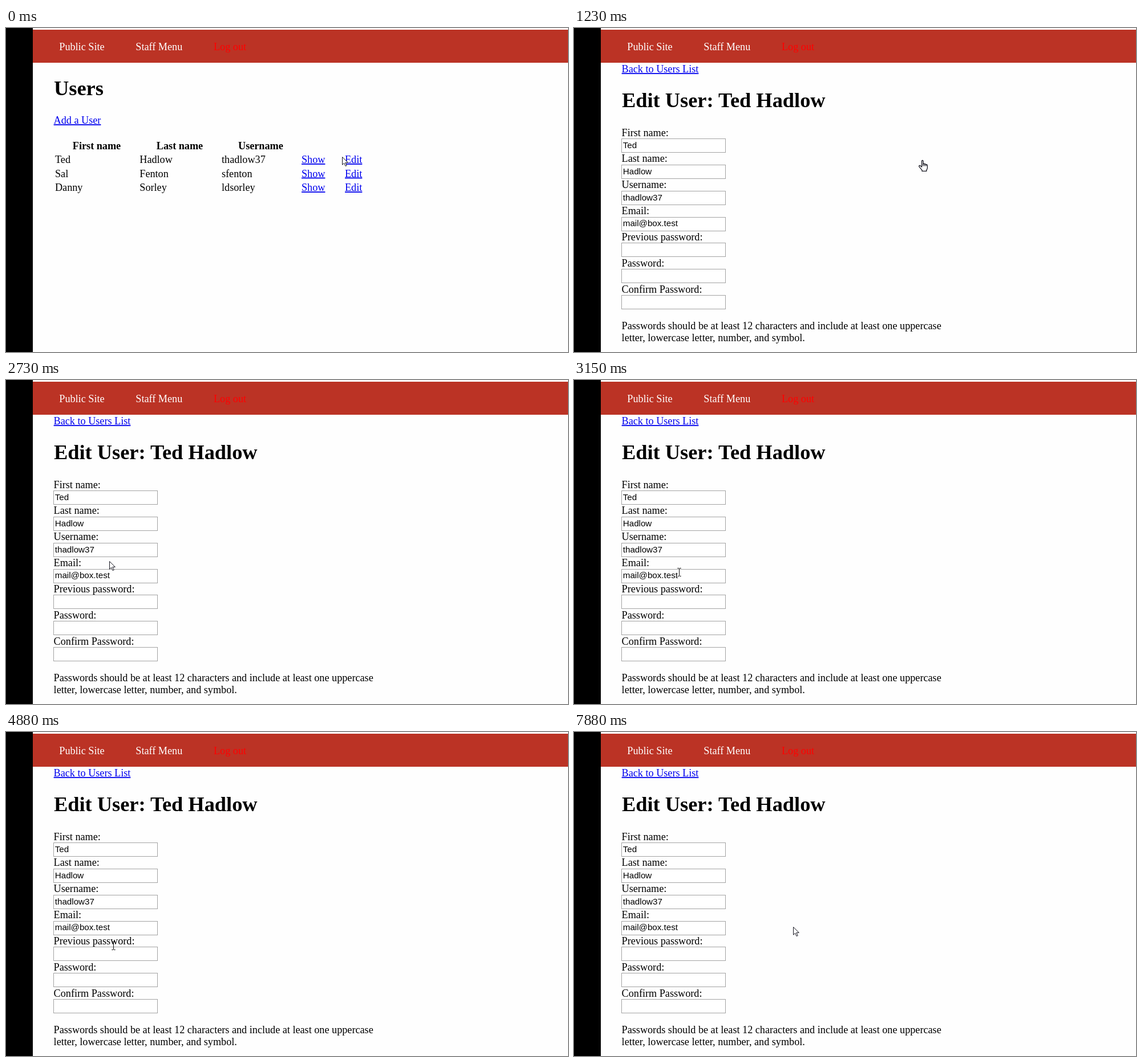
An HTML page that plays this animation: 985x569 px, repeating every 8 s.

```html
<!DOCTYPE html>
<html lang="en">
<head>
<meta charset="utf-8">
<title>User administration</title>
<style>
  html, body { margin: 0; width: 100%; height: 100%; overflow: hidden; background: #fefefe; }
  svg { display: block; width: 100%; height: 100%; }
  text { font: 18.18px "Liberation Serif", "Times New Roman", serif; fill: #000; white-space: pre; }
  .nav { fill: #fff; }
  .logout { fill: #f00; }
  .title { font-size: 36.36px; font-weight: bold; }
  .head { font-weight: bold; text-anchor: middle; }
  .link { fill: #00e; text-decoration: underline; }
  .value { font: 15.15px "Liberation Sans", Arial, sans-serif; }
  .field { fill: #fff; stroke: #a3a3a3; }
  .cursor { fill: #fff; stroke: #161620; stroke-linejoin: round; }
  #hand { stroke-width: 1.3; }
</style>
</head>
<body>
<svg viewBox="0 0 985 569">
  <rect width="985" height="569" fill="#fefefe"/>
  <rect x="47" y="3" width="938" height="58" fill="#bb3325"/>
  <rect width="47" height="569" fill="#000"/>
  <g id="nav"></g>
  <g id="list"></g>
  <g id="form"></g>
  <g id="cursor">
    <path id="arrow" class="cursor" d="M.5 .6V14.2L3.7 11.2L6 16.5L8.2 15.6L5.9 10.4H10.3Z"/>
    <g id="hand" class="cursor">
      <path d="M5.5 12V2Q5.5 .5 6.7 .5T8 2V7Q8.3 6 9.4 6.2T10.6 7.5Q11 6.6 12 6.9T13.1 8.2Q13.5 7.5 14.4 7.9T15.4 9.4V13.5Q15.2 15.8 13.8 17.5V19.4H6V17.6L1 11.6Q.2 10.2 1.2 9.6T3.4 10.2Z"/>
      <path fill="none" d="M8 6.5V10.5M10.6 7.5V10.5M13.1 8.2V10.5"/>
    </g>
    <path id="beam" fill="none" stroke="#111" d="M.3 .5H3M4 .5H6.7M3.5 1V14M.3 14.5H3M4 14.5H6.7"/>
  </g>
</svg>
<script>
const LOOP = 8000;
const FORM_OPENS = 1230;
const byId = id => document.getElementById(id);

function add(parent, tag, attrs, content = "") {
  const node = document.createElementNS("http://www.w3.org/2000/svg", tag);
  for (const key in attrs) node.setAttribute(key, attrs[key]);
  node.textContent = content;
  parent.appendChild(node);
}
const write = (parent, x, y, content, style = "") =>
  add(parent, "text", { x, y, class: style }, content);

const nav = byId("nav"), list = byId("list"), form = byId("form");

write(nav, 93.3, 39, "Public Site", "nav");
write(nav, 227.3, 39, "Staff Menu", "nav");
write(nav, 364, 39, "Log out", "logout");

write(list, 84, 118, "Users", "title");
write(list, 83.6, 168, "Add a User", "link");
write(list, 159, 213, "First name", "head");
write(list, 304.5, 213, "Last name", "head");
write(list, 446.4, 213, "Username", "head");
const columns = [86, 234.3, 378, 518, 594];
const users = [
  ["Ted", "Hadlow", "thadlow37"],
  ["Sal", "Fenton", "sfenton"],
  ["Danny", "Sorley", "ldsorley"]
];
users.forEach((user, row) => [...user, "Show", "Edit"].forEach((cell, i) =>
  write(list, columns[i], 237 + row * 24.6, cell, i > 2 ? "link" : "")));

write(form, 83.6, 78, "Back to Users List", "link");
write(form, 84, 139, "Edit User: Ted Hadlow", "title");
const fields = [
  ["First name:", "Ted"],
  ["Last name:", "Hadlow"],
  ["Username:", "thadlow37"],
  ["Email:", "mail@box.test"],
  ["Previous password:", ""],
  ["Password:", ""],
  ["Confirm Password:", ""]
];
fields.forEach(([label, value], i) => {
  const top = 194 + i * 45.85;
  write(form, 83.6, Math.round(top - 4.5), label);
  add(form, "rect", { x: 83.5, y: Math.round(top) + .5, width: 182, height: 24, class: "field" });
  write(form, 85.8, Math.round(top + 16.8), value, "value");
});
write(form, 83.6, 529, "Passwords should be at least 12 characters and include at least one uppercase");
write(form, 83.6, 550, "letter, lowercase letter, number, and symbol.");

// Pointer path: start time, shape, left, top
const path = [
  [0, "arrow", 589, 226], [120, "arrow", 594, 228],
  [270, "hand", 600, 231], [400, "hand", 604, 232],
  [680, "arrow", 608, 232], [1230, "hand", 604, 232],
  [1910, "arrow", 350, 215], [2030, "beam", 146, 198],
  [2310, "beam", 146, 209], [2450, "beam", 171, 298],
  [2600, "arrow", 178, 312], [2730, "arrow", 181, 318],
  [2870, "arrow", 183, 322], [3000, "arrow", 184, 324],
  [3150, "beam", 181, 330], [3300, "beam", 180, 327],
  [3420, "beam", 185, 332], [3550, "beam", 183, 336],
  [3690, "beam", 181, 346], [3810, "beam", 183, 361],
  [4210, "beam", 184, 363], [4330, "beam", 184, 364],
  [4450, "beam", 184, 365], [4730, "beam", 184, 366],
  [4880, "beam", 185, 368], [7590, "beam", 188, 364],
  [7730, "arrow", 339, 345], [7880, "arrow", 384, 342]
];

const show = (node, visible) => node.setAttribute("visibility", visible ? "visible" : "hidden");

function render(time) {
  const [, shape, x, y] = path.findLast(step => step[0] <= time);
  show(list, time < FORM_OPENS);
  show(form, time >= FORM_OPENS);
  for (const id of ["arrow", "hand", "beam"]) show(byId(id), id === shape);
  byId("cursor").setAttribute("transform", `translate(${x} ${y})`);
}

const start = performance.now();
function tick() {
  render((performance.now() - start) % LOOP);
  requestAnimationFrame(tick);
}
tick();
</script>
</body>
</html>
```
